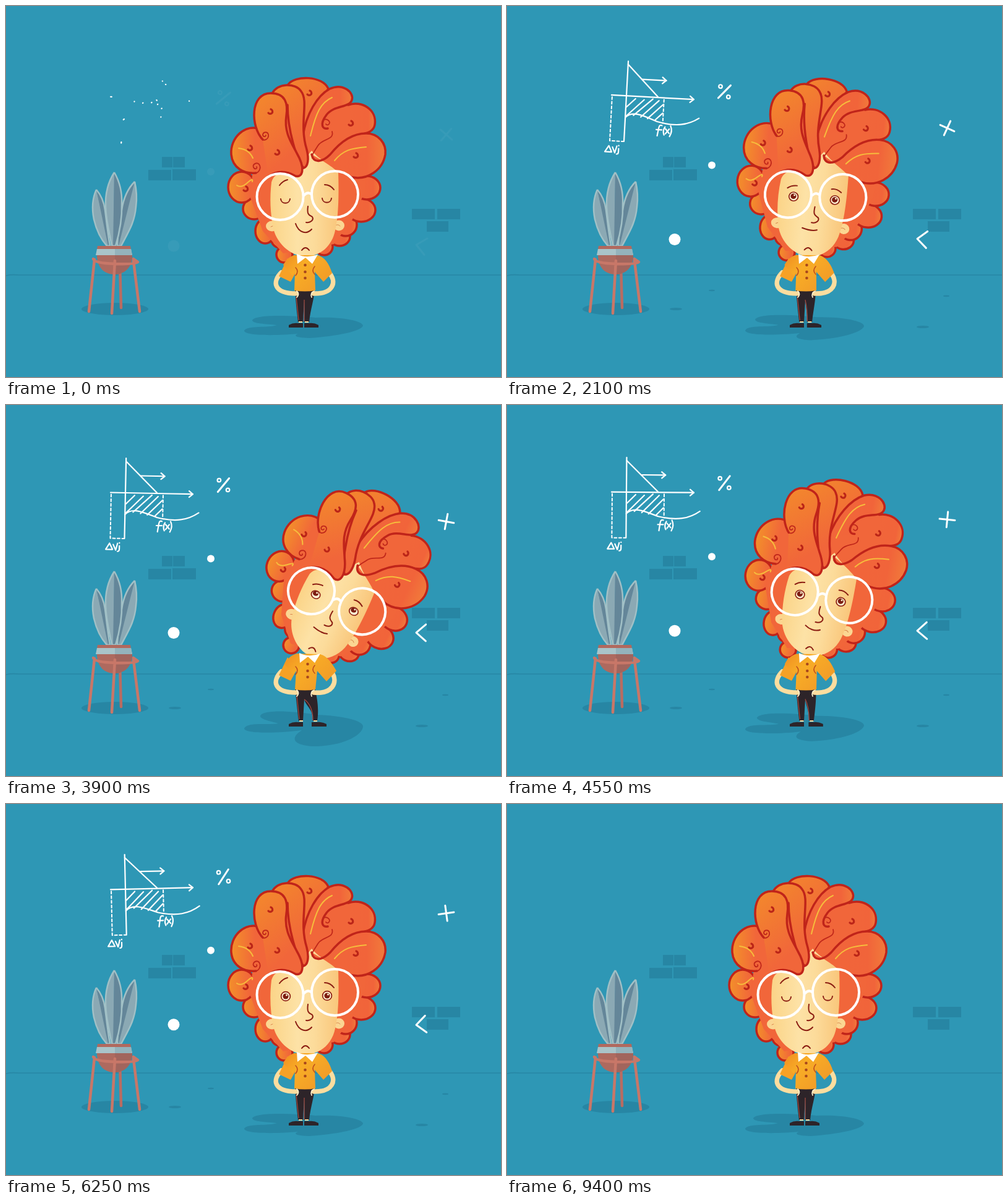
Recreate the animation shown at these times as an HTML page. Size 800 by 600 pixels, loop 9.55 s.

```html
<!DOCTYPE html>
<html lang="en">
<head>
<meta charset="utf-8">
<title>Thinking it over</title>
<style>
  html, body { margin: 0; width: 100%; height: 100%; overflow: hidden; background: #2e97b5; }
  svg { display: block; width: 100vw; height: 100vh; }
  .line { fill: none; stroke-linecap: round; stroke-linejoin: round; }
  .chalk { stroke: #fff; stroke-width: 2.2; }
  .ink { stroke: #8b1d12; stroke-width: 2; }
  .shine { stroke: #f6bd3c; stroke-width: 2; }
  .hair { stroke: #c0241a; stroke-width: 3.5; stroke-linecap: round; }
  .swirl { stroke: #c0271a; stroke-width: 1.8; }
  .brick, .shade { fill: #2786a4; }
  .skin { stroke: #fcdd9f; stroke-width: 7.5; }
</style>
</head>
<body>
<svg viewBox="0 0 800 600">
  <defs>
    <linearGradient id="warm" gradientUnits="userSpaceOnUse" x1="375" y1="130" x2="490" y2="260"><stop stop-color="#f59129"/><stop offset=".4" stop-color="#f27c31"/><stop offset=".8" stop-color="#f1663a"/></linearGradient>
    <linearGradient id="low"><stop stop-color="#f3912a"/><stop offset=".8" stop-color="#f1663a"/></linearGradient>
    <linearGradient id="cool"><stop stop-color="#f1663a"/><stop offset=".75" stop-color="#f1643a"/><stop offset="1" stop-color="#f17b3b"/></linearGradient>
    <linearGradient id="faceFill"><stop stop-color="#fbd488"/><stop offset=".4" stop-color="#fde2a6"/><stop offset=".65" stop-color="#fcdb9a"/><stop offset="1" stop-color="#f9c67b"/></linearGradient>
    <linearGradient id="shirtFill" y2=".7"><stop stop-color="#f08d22"/><stop offset=".4" stop-color="#f8ad26"/><stop offset="1" stop-color="#f19a28"/></linearGradient>
  </defs>

  <path d="M0 436Q8 434 20 435H800" fill="none" stroke="#2787a5" stroke-width="1.6"/>
  <path class="brick" d="M252 244h17v17h-17zM270 244h19v17h-19zM230 265h37v17h-37zM269 264h38v18h-38zM656 328h37v17h-37zM697 328h37v17h-37zM680 348h35v17h-35z"/>

  <g id="plant">
    <ellipse class="shade" cx="176" cy="490" rx="54" ry="10"/>
    <g id="leaves" stroke="#a1c0c6" stroke-width="2.5" stroke-linejoin="round"></g>
    <path d="M184 418L186 488" class="line" stroke="#b96c62" stroke-width="4.5"/>
    <path d="M147 403H204C204 424 190 434 175 434S147 424 147 403" fill="#ae6a5f"/>
    <path d="M176 403H204C204 424 190 434 176 434" fill="#a1655d"/>
    <path d="M148 388H201L202 394H147Z" fill="#b1695e"/>
    <path d="M147 393H202L204 403H145Z" fill="#a9c4c9"/>
    <path d="M176 393H202L204 403H176Z" fill="#94b3bc"/>
    <path d="M141 409Q142 416 176 417T213 414L206 409M143 410L134 494M176 412L171 497M206 412L216 494" class="line" stroke="#c87768" stroke-width="4.5"/>
  </g>

  <g id="floorMarks" class="shade">
    <ellipse cx="273" cy="490" rx="10" ry="2"/><ellipse cx="331" cy="460" rx="5" ry="1.2"/>
    <ellipse cx="672" cy="519" rx="10" ry="2"/><ellipse cx="710" cy="469" rx="5" ry="1.2"/>
  </g>
  <g id="equation" class="line chalk"></g>
  <g id="symbols" class="line" stroke="#fff" stroke-width="3">
    <g id="percent"><circle cx="-7" cy="-7" r="2.8" stroke-width="2.2"/><circle cx="8" cy="8" r="2.8" stroke-width="2.2"/><path d="M-8 12L9 -11"/></g>
    <path id="cross" d="M-12.5 0H12.5M0 -12.5V12.5"/>
    <path id="angle" d="M7 -14L-8 0L8 13"/>
    <circle id="smallBall" r="6" fill="#fff" stroke="none"/>
    <circle id="bigBall" r="9.5" fill="#fff" stroke="none"/>
  </g>

  <path id="shadow" class="shade"/>

  <g id="head">
    <g id="backHair" class="hair"></g>
    <path d="M404 200L430 145L478 130L555 150L588 215L580 300L560 345L530 385L448 400L415 364L395 310Z" fill="#f1663a"/>
    <g fill="#fbd692"><ellipse cx="430" cy="356" rx="10" ry="8.5"/><ellipse cx="538" cy="355" rx="9" ry="8.5"/></g>
    <path d="M428 357Q432 354 437 356M532 355Q537 352 540 356" class="line" stroke="#d98a4d"/>
    <path d="M494 234C478 250 480 276 468 274C450 268 434 268 429 285C426 310 427 335 432 360C439 388 464 405 484 405C508 405 527 388 532 363C538 338 538 300 537 270C530 260 510 252 494 234" fill="url(#faceFill)"/>
    <g id="frontHair" class="hair"></g>
    <path class="line swirl" d="M527 203C531 217 511 214 504 226C498 236 494 240 495 246M412 214C417 220 425 215 424 208C423 203 416 203 415 208C415 212 420 212 420 209M401 270C409 271 413 262 409 256C405 252 398 256 400 261C402 265 407 263 405 260M512 192C509 185 516 181 521 185C526 189 520 195 517 191"/>
    <path class="line shine" d="M376 230Q393 232 399 246M373 290Q380 295 390 286T398 284M492 210C496 194 499 181 506 168C512 157 520 151 527 148M531 250C545 233 558 230 582 228"/>
    <g id="curls" fill="none" stroke="#bb2518" stroke-width="3.2" stroke-linecap="round"></g>
    <g class="line ink">
      <path id="brows"/>
      <path d="M488 324C486 338 490 338 495 341C498 346 492 351 485 350"/>
      <path id="mouth"/>
      <path d="M478 395Q484 387 490 395"/>
      <path id="lids" d="M444 312C445 321 458 321 459 312M511 311C512 320 525 320 526 311"/>
    </g>
    <g id="eyes" fill="#fff3d4" stroke="#8b1d12" stroke-width="1.7">
      <circle cx="452" cy="311" r="7.4"/><circle cx="519" cy="310" r="7.4"/>
      <g id="pupils" stroke="none"><g fill="#7c1d12"><circle cx="452" cy="311" r="4.6"/><circle cx="519" cy="310" r="4.6"/></g>
      <circle cx="453.5" cy="309" r="1.5"/><circle cx="520.5" cy="308" r="1.5"/></g>
    </g>
    <path d="M482 306Q487 300 493 304" class="line" stroke="#fff" stroke-width="4"/>
    <g fill="none" stroke="#fff" stroke-width="4"><circle cx="443" cy="308.5" r="37.5"/><circle cx="531.5" cy="304.5" r="37.5"/></g>
  </g>

  <g id="body">
    <path id="legs" fill="#2d2429"/>
    <path id="seam" fill="none" stroke="#a84a3f" stroke-width="1.2"/>
    <path id="ankles" stroke="#fcdd9f" stroke-width="2"/>
    <path id="shoes" fill="#2d2429"/>
    <path id="leftArm" class="line skin"/>
    <path id="rightArm" class="line skin"/>
    <path id="leftSleeve" fill="#f6a126"/>
    <path id="shirt" fill="url(#shirtFill)"/>
    <path d="M468 423Q474 429 468 436M499 421Q493 428 499 434" class="line" stroke="#bd4d1f" stroke-width="1.6"/>
    <g id="collar"><path d="M470 401L471 417L484 407L495 417L504 402Q485 409 470 401" fill="#fff"/>
    <g fill="#a9481c"><circle cx="483.5" cy="419" r="2.3"/><circle cx="483.5" cy="430" r="2.3"/><circle cx="483.5" cy="440" r="2.3"/></g></g>
    <path d="M470 461Q475 466 470 471M498 461Q491 465 494 471" class="line" stroke="#fdeecb" stroke-width="1.8"/>
  </g>
</svg>
<script>
const LOOP = 9550;
const $ = id => document.getElementById(id);
const set = (id, attrs) => { for (const k in attrs) $(id).setAttribute(k, attrs[k]); };
const path = (d, attrs = '') => `<path d="${d}" ${attrs}/>`;
const ramp = (t, a, b) => { const x = Math.min(1, Math.max(0, (t - a) / (b - a))); return x * x * (3 - 2 * x); };
const hold = (t, a, b, c, d) => ramp(t, a, b) - ramp(t, c, d);

// Blend two paths that share the same commands.
const mix = (a, b, k) => {
  const num = /-?\d+(\.\d+)?/g, to = b.match(num);
  let i = 0;
  return a.replace(num, n => (+n + (to[i++] - n) * k).toFixed(2));
};

// A leaf is a left and a right half around its spine, then one outline.
const LIGHT = '#8ba9b4', DARK = '#648699';
const leaf = (tip, left, right, leftFill, rightFill) =>
  path(`M${tip}${left}Z`, `fill="${leftFill}" stroke="none"`) +
  path(`M${tip}${right}Z`, `fill="${rightFill}" stroke="none"`) +
  path(`M${tip}${left}M${tip}${right}`, 'fill="none"');
$('leaves').innerHTML =
  leaf('146 297', 'C140 310 138 325 142 345C146 362 154 378 163 388H167', 'C153 305 158 315 160 330C162 345 164 365 168 388H165', LIGHT, DARK) +
  leaf('208 284', 'C197 295 190 310 187 330C184 350 180 370 180 388H183', 'C211 297 212 310 210 325C208 350 198 365 186 388H182', DARK, LIGHT) +
  leaf('175 269', 'C166 283 160 300 161 325C162 350 168 370 171 388H174', 'C183 283 188 300 187 320C188 345 184 365 177 388H173', LIGHT, DARK);

const lobe = (cx, cy, rx, ry, fill) => `<ellipse cx="${cx}" cy="${cy}" rx="${rx}" ry="${ry}" fill="url(#${fill})"/>`;
$('backHair').innerHTML =
  [[450, 402, 13, 13], [443, 378, 14, 13], [419, 364, 16, 20], [401, 328, 18, 17], [381, 293, 22, 25]].map(e => lobe(...e, 'low')).join('') +
  [[514, 389, 14, 14], [539, 373, 17, 15], [549, 354, 18, 18], [574, 330, 23, 19], [583, 294, 22, 19]].map(e => lobe(...e, 'cool')).join('');

$('frontHair').innerHTML = [
  ['M456 127C466 112 512 112 521 134C505 155 485 180 480 215', 'warm'],
  ['M553 160C575 152 600 168 596 192C594 205 580 206 565 210', 'cool'],
  ['M480 210C485 175 503 145 523 134C545 124 563 140 559 152C555 165 530 160 518 176C506 192 512 200 520 198', 'cool'],
  ['M494 240C497 256 512 252 524 240C545 214 565 206 582 206C602 206 615 222 613 240C609 264 585 284 555 276', 'cool'],
  ['M412 199C385 190 362 214 364 240C366 262 385 272 404 270', 'low'],
  ['M430 142C438 124 468 124 477 138C490 155 473 190 486 232C490 248 488 260 481 262C470 250 455 200 455 160', 'warm'],
  ['M415 216C395 195 394 141 428 141C452 141 456 158 453 178C449 205 462 222 470 238C484 262 480 278 468 275C456 268 440 264 424 276', 'warm'],
].map(([d, fill]) => path(d, `fill="url(#${fill})"`)).join('');

$('curls').innerHTML = [[427, 171], [490, 141], [557, 190], [565, 242], [394, 230], [438, 237], [387, 296]]
  .map(([x, y]) => path(`M${x - 3} ${y + 2}a4 4 0 0 0 6 0a4 4 0 0 0 -2 -6`)).join('');

// Chalk strokes: "wiped" ones vanish from their start, "late" ones are written after the rest.
const plain = ['M169 140H302', 'M250 107L256 112L250 117', 'M296 135L302 140L296 145'];
const wiped = ['M193 213V84', 'M193 175C205 162 225 172 245 179C275 186 295 182 312 170', 'M244 139L193 89', 'M256 112H217',
  'M208 144L194 158', 'M222 145L194 173', 'M236 143L206 171', 'M246 145L218 173', 'M253 151L229 175', 'M253 165L241 177'];
const late = ['M253 185Q249 183 248 189L246 202', 'M244 192H253', 'M258 187Q254 193 257 200', 'M259 190L265 197', 'M265 190L259 198', 'M267 185Q271 193 266 202',
  'M163 232L169 222L174 232Z', 'M175 224L179 233L182 222', 'M185 226V231Q185 235 182 235', 'M185 221V221.5'];
const dashed = ['M170 143V214H193', 'M254 143V181'];
const strokes = (list, kind) => list.map(d => path(d, `pathLength="1" class="solid ${kind}"`)).join('');
$('equation').innerHTML = strokes(plain, 'plain') + strokes(wiped, 'wiped') + strokes(late, 'late') +
  dashed.map(d => path(d, 'class="dashed" stroke-width="2"')).join('');
const solids = [...document.querySelectorAll('.solid')];
const dashes = [...document.querySelectorAll('.dashed')].map(el => ({ el, n: el.getTotalLength() / 7.5 }));

function drawEquation(t) {
  const leaving = t > 5000;
  const p = leaving ? 1 - ramp(t, 7100, 7740) : .012 + .988 * ramp(t, 0, 1000);
  const pLate = leaving ? p : ramp(t, 100, 1100);
  const rise = (5000 - t) * .0018, turn = (5000 - t) * .00107;
  set('equation', { transform: `translate(0 ${rise}) rotate(${turn} 193 140)`, visibility: p < .005 ? 'hidden' : 'visible' });
  for (const el of solids) {
    const shown = el.classList.contains('late') ? pLate : p;
    el.style.visibility = shown > 0 ? 'inherit' : 'hidden';
    el.style.strokeDasharray = `${shown} 2`;
    el.style.strokeDashoffset = leaving && el.classList.contains('wiped') ? p - 1 : 0;
  }
  for (const { el, n } of dashes) {
    el.style.visibility = pLate > 0 ? 'inherit' : 'hidden';
    el.style.strokeDasharray = '4 3.5 '.repeat(Math.ceil(n * pLate)) + '0 999';
  }
}

function drawSymbols(t) {
  const age = t - 5000;
  const place = (id, x, y, turn = 0) => set(id, { transform: `translate(${x} ${y - age * .005}) rotate(${turn})` });
  place('percent', 351, 123.5, -age * .0028 - Math.max(0, t - 7000) * .025);
  place('cross', 711.5, 183, 2 - age * .0078);
  place('angle', 671, 363, -age * .0025);
  place('smallBall', 331, 243);
  place('bigBall', 271, 363);
  const show = (.05 + .95 * ramp(t, 0, 900)) * (1 - ramp(t, 7300, 8150));
  set('symbols', { opacity: show });
  set('floorMarks', { opacity: ramp(t, 100, 1000) * (1 - ramp(t, 7300, 8000)) });
}

// Left arm and sleeve: on the hip, hanging, swung out.
const HIP = ['M445 431C430 446 432 465 469 465', 'M455 408L441 437L460 446L470 428Z'];
const HANG = ['M441 422C414 432 417 452 431 477', 'M445 407L437 434L462 438L470 428Z'];
const SWING = ['M441 422C424 434 406 426 396 398', 'M445 406L435 422L455 439L470 428Z'];
const armKeys = [[6450, HIP], [6650, HANG], [6900, SWING], [7200, SWING], [7550, HANG], [7700, HANG], [8150, HIP]];

function drawArm(t) {
  let pose = HIP;
  armKeys.forEach(([at, from], i) => {
    const next = armKeys[i + 1];
    if (next && t >= at && t < next[0]) pose = from.map((d, j) => mix(d, next[1][j], ramp(t, at, next[0])));
  });
  set('leftArm', { d: pose[0] });
  set('leftSleeve', { d: pose[1] });
}

function drawPerson(t) {
  const tilt = hold(t, 1850, 2650, 4150, 4900);
  const flat = hold(t, 900, 1250, 4400, 4900);
  const open = hold(t, 900, 1050, 9080, 9250);
  const lidded = open * (1 - .15 * tilt);
  set('head', { transform: `rotate(${24.5 * tilt} 486.2 420.8)` });
  set('brows', { d: mix('M442 290Q447 283 455 281M515 289Q524 289 530 297', 'M441 298Q447 293 456 293M512 293Q520 291 528 297', flat) });
  set('mouth', { d: mix('M468 352C473 367 486 370 494 361', 'M471 360C478 362 487 364 495 361', flat) });
  set('eyes', { transform: `translate(0 ${311 * (1 - lidded)}) scale(1 ${lidded})`, visibility: open > .05 ? 'visible' : 'hidden' });
  set('lids', { visibility: open > .3 ? 'hidden' : 'visible' });
  set('pupils', { transform: `translate(${-tilt} ${-2 * tilt})` });

  set('legs', { d: mix(
    'M467 457H499C498 475 492 490 490 511H482C482 498 482 485 482 475L480 511H472C470 495 468 475 467 457Z',
    'M467 457H499C503 475 506 490 503 511H496C496 490 485 488 482 476L480 511H473C471 495 469 475 467 457Z', tilt) });
  set('seam', { d: mix('M469 470L473 508M482 475Q482 490 482 510', 'M470 470L474 508M482 476Q496 486 496 510', tilt) });
  set('ankles', { d: mix('M473 511H479M483 511H489', 'M474 511H480M497 511H503', tilt) });
  set('shoes', { d: mix(
    'M457 520V516Q464 512 472 513H480V520ZM482 520V513H490Q498 512 505 516V520Z',
    'M457 520V516Q464 512 472 513H480V520ZM494 520V513H502Q511 512 518 516V520Z', tilt) });
  set('rightArm', { d: mix('M522 431C536 447 528 466 497 465', 'M526 431C538 449 527 468 497 465', tilt) });
  set('shirt', { d: mix(
    'M466 403C458 405 452 411 448 419L463 436L467 430L466 460Q483 463 500 460L499 430L513 446L527 432C522 416 514 405 503 403Z',
    'M470 402C460 405 454 411 450 419L464 436L469 430L467 460Q483 463 500 460L503 430L518 447L534 430C526 416 518 405 507 403Z', tilt) });
  set('collar', { transform: `translate(${4 * tilt} 0)` });
  set('shadow', { d: mix(
    'M398 508C406 498 465 501 500 504C545 502 577 510 577 517C574 526 535 534 490 537C466 536 465 533 472 530C440 533 385 534 385 525C390 516 425 521 438 516C420 514 398 514 398 508Z',
    'M411 503C414 492 465 495 502 501C545 503 577 510 577 520C576 534 545 552 496 552C466 550 457 540 478 526C440 531 385 532 385 523C390 512 425 518 440 515C425 511 411 508 411 503Z', tilt) });
}

function drawPlant(t) {
  const s = Math.max(0, t - 6850);
  const sway = -19 * Math.sin(s * 2 * Math.PI / 900) * Math.exp(-s / 300);
  set('leaves', { transform: `rotate(${sway} 174 389)` });
}

function frame(now) {
  const t = now % LOOP;
  drawEquation(t);
  drawSymbols(t);
  drawArm(t);
  drawPerson(t);
  drawPlant(t);
}

const start = performance.now();
(function tick() {
  frame(performance.now() - start);
  requestAnimationFrame(tick);
})();
</script>
</body>
</html>
```
